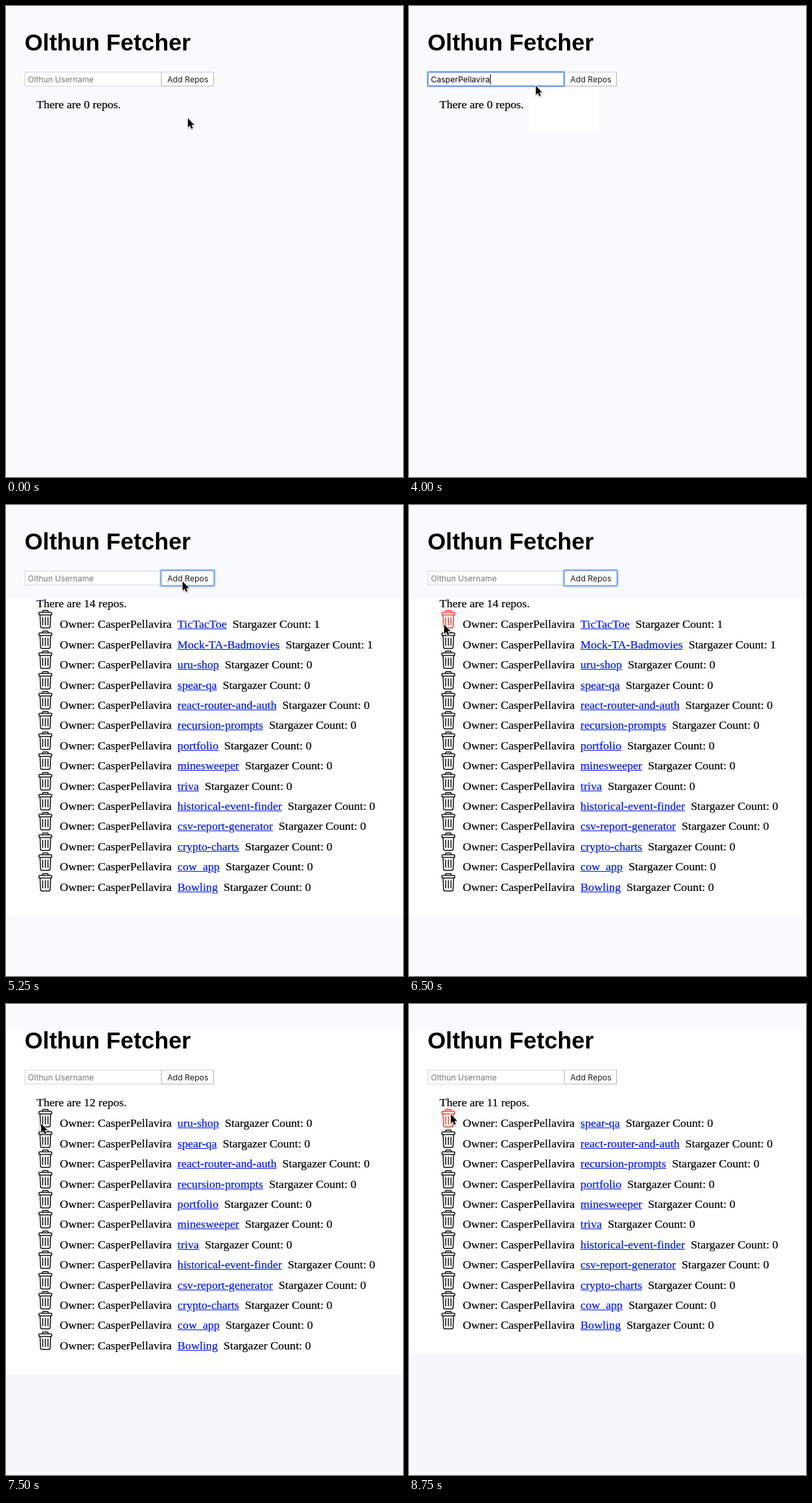
Animation of 598x709 px, one loop 9500 ms. Source, as an HTML page:

```html
<!DOCTYPE html>
<html lang="en">
<head>
<meta charset="utf-8">
<title>Olthun Fetcher</title>
<style>
  html, body { margin: 0; width: 100%; height: 100%; overflow: hidden; background: #f9fafc; }
  #stage { position: relative; width: 598px; height: 709px; overflow: hidden; color: #000; }
  #stage div, #stage svg, h1 { position: absolute; box-sizing: border-box; white-space: pre; }
  h1 { margin: 0; left: 28px; top: 35px; font: bold 35.2px/40px "Liberation Sans", Arial, sans-serif; }
  .line { font: 17.6px/20px "Liberation Serif", Times, serif; -webkit-text-stroke: .2px; }
  .line u { color: #0018e8; }
  .ui { font: 12px/15px Inter, sans-serif; }
  #field, #button { top: 99px; height: 22px; background: #fff; padding-top: 3px; }
  #field { left: 28px; width: 206px; border: 1px solid #d6d7d9; padding-left: 4px; }
  #button { left: 234px; width: 79px; padding-left: 8px; color: #1c1c1c;
    border: 1px solid #d0d0d2; border-right-color: #b4b4b6; border-bottom-color: #b4b4b6; }
  #hint { left: 4px; top: 3px; color: #777; }
  #caret { display: none; width: 1px; height: 15px; background: #000; vertical-align: top; }
  #stage .focus { border-color: #6694ec; z-index: 1; border-radius: 1px;
    box-shadow: inset 0 0 1px 1px #a9c4f7, 0 0 1px 1px #7ba4f1; }
  #stage #button.focus { border-color: #c4d6f9; box-shadow: 0 0 0 1px #6f9cf0, 0 0 2px 2px #7ba4f1; }
  .focus #caret { display: inline-block; }
  .bin { left: 48px; width: 23px; height: 30px; fill: none; stroke: #111; stroke-width: 1.5; stroke-linecap: round; }
  .hot { stroke: #e8402f; }
  #arrow { left: 0; top: 0; width: 16px; height: 22px; overflow: visible; z-index: 2;
    filter: drop-shadow(0 1px 1px rgba(0, 0, 0, .3)); }
</style>
</head>
<body>
<div id="stage">
  <div id="back" style="inset:0"></div>
  <h1>Olthun Fetcher</h1>
  <div id="field" class="ui"><div id="hint">Olthun Username</div><span id="typed"></span><span id="caret"></span></div>
  <div id="button" class="ui">Add Repos</div>
  <div id="total" class="line" style="left:46px;top:138px"></div>
  <div id="list" style="left:0;top:0"></div>
  <svg id="arrow"><path d="M0 0V13.8L3.1 11L5.2 15.8L7.5 14.8L5.4 10.1H9.6Z" stroke="#fff" stroke-width="1.6" paint-order="stroke"/></svg>
</div>
<script>
const LOOP = 9500, STEP = 250, PITCH = 30.4;
const OWNER = "CasperPellavira";
const REPOS = ["TicTacToe", "Mock-TA-Badmovies", "uru-shop", "spear-qa", "react-router-and-auth",
  "recursion-prompts", "portfolio", "minesweeper", "triva", "historical-event-finder",
  "csv-report-generator", "crypto-charts", "cow_app", "Bowling"];
const BASE = "#f9fafc", WHITE = "#fefefe", LILAC = "#f6f6fc";

const FOCUS = 1000, TYPE = 1750, TYPE_END = 3750, ADD = 4750, LOADED = 5250, HOVER = 6500;
const DELETES = [6750, 7500, 8500];

// Stops of the pointer, joined by eased moves.
const STOPS = [
  { t: 0, x: 274, y: 169 },
  { t: 750, x: 169, y: 111 }, { t: 3750, x: 169, y: 111 },
  { t: 4000, x: 191, y: 120 },
  { t: 4500, x: 266, y: 115 }, { t: 5750, x: 266, y: 115 },
  { t: HOVER, x: 53, y: 180 }, { t: 8250, x: 53, y: 180 },
  { t: 8500, x: 63, y: 166 }, { t: LOOP, x: 63, y: 166 }
];

const $ = id => document.getElementById(id);
const easeOut = p => 1 - (1 - p) ** 3;

function pointer(t) {
  const i = STOPS.findIndex(stop => stop.t > t);
  const a = STOPS[i - 1], b = STOPS[i];
  const p = easeOut((t - a.t) / (b.t - a.t));
  return [a.x + (b.x - a.x) * p, a.y + (b.y - a.y) * p].map(Math.round);
}

function typedText(t) {
  if (t < TYPE || t >= ADD) return "";
  const p = Math.min(1, (t - TYPE) / (TYPE_END - TYPE));
  return OWNER.slice(0, Math.round(1 + p * (OWNER.length - 1)));
}

function focused(t) {
  if (t < FOCUS || t >= DELETES[0]) return "";
  return t < ADD ? "field" : "button";
}

function backdrop(t, gone) {
  if (t < STEP) return BASE;
  if (t < LOADED) return `linear-gradient(${WHITE}, ${WHITE}) 182px 122px / 104px 66px no-repeat, ${BASE}`;
  const top = Math.max(41, 141 - 50 * gone);
  const end = Math.round(618 - gone * PITCH);
  const low = gone > 1 ? 709 : 618;
  return `linear-gradient(${BASE} ${top}px, ${WHITE} ${top}px ${end}px, ${LILAC} ${end}px ${low}px, ${BASE} ${low}px)`;
}

function row(name, i, hot) {
  const y = Math.round(169.4 + PITCH * i);
  const stars = REPOS.indexOf(name) < 2 ? 1 : 0;
  return `<svg class="bin${hot ? " hot" : ""}" style="top:${y - 12}px">` +
    `<rect x="1.5" y="4.5" width="19.5" height="4" rx="1.8"/>` +
    `<path d="M7 4.3V3.4Q7 1.8 8.6 1.8H14Q15.6 1.8 15.6 3.4V4.3M3.3 8.8L4 25.5Q4.1 28 6.5 28H16Q18.4 28 18.5 25.5L19.2 8.8M7.3 12.5V23.5M11.3 12.5V23.5M15.3 12.5V23.5"/></svg>` +
    `<div class="line" style="left:81px;top:${y}px">Owner: ${OWNER}&nbsp;&nbsp;<u>${name}</u>&nbsp;&nbsp;Stargazer Count: ${stars}</div>`;
}

function draw(t) {
  const [x, y] = pointer(t), focus = focused(t), typed = typedText(t);
  const gone = DELETES.filter(start => start <= t).length;
  const repos = t < LOADED ? [] : REPOS.slice(gone);
  // A row that slides under the pointer turns red one step later.
  const hot = t >= HOVER && !DELETES.includes(t);
  $("arrow").style.transform = `translate(${x}px, ${y}px)`;
  $("back").style.background = backdrop(t, gone);
  $("typed").textContent = typed;
  $("hint").hidden = typed !== "";
  for (const id of ["field", "button"]) $(id).classList.toggle("focus", id === focus);
  $("total").textContent = `There are ${repos.length} repos.`;
  $("list").innerHTML = repos.map((name, i) => row(name, i, hot && i === 0)).join("");
}

let last = -1;
function tick() {
  const t = Math.floor(performance.now() % LOOP / STEP) * STEP;
  if (t !== last) draw(last = t);
  requestAnimationFrame(tick);
}
tick();
</script>
</body>
</html>
```
